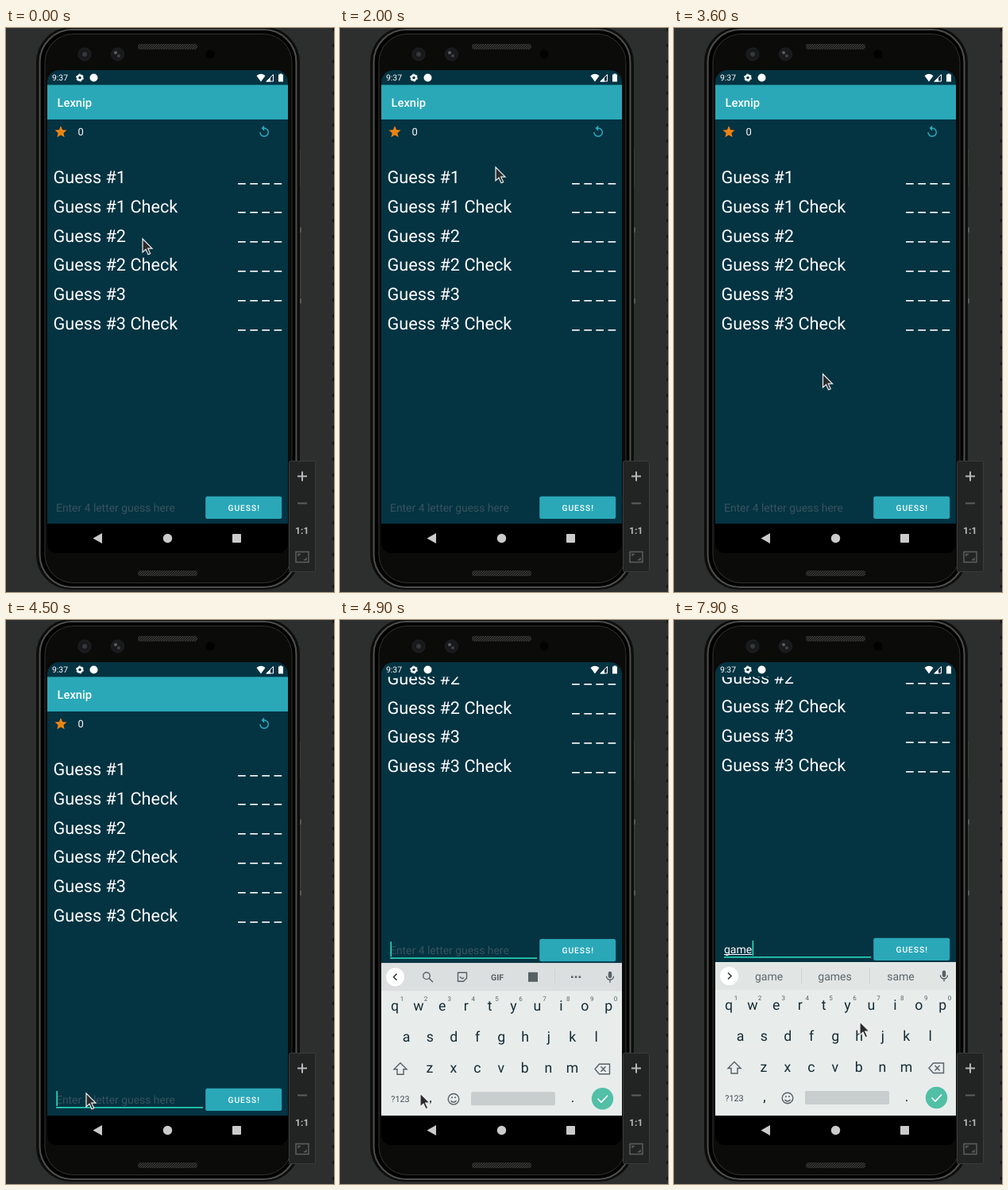
Recreate the animation shown at these times as an HTML page. Size 413 by 709 pixels, loop 8 s.

```html
<!DOCTYPE html>
<html lang="en">
<head>
<meta charset="utf-8">
<title>Word game on a phone</title>
<style>
  html, body { margin: 0; width: 100%; height: 100%; overflow: hidden; background: #2d2f2f; }
  svg { display: block; width: 413px; height: 709px; font-family: Roboto, sans-serif; text-rendering: geometricPrecision; }
  .mid { text-anchor: middle; }
  .line { fill: none; stroke: #566166; stroke-width: 1.4; }
</style>
</head>
<body>
<svg viewBox="0 0 413 709">
  <defs>
    <clipPath id="below"><rect x="52" y="71.500" width="303" height="551.500"/></clipPath>
    <pattern id="mesh" width="3" height="3" patternUnits="userSpaceOnUse">
      <rect width="3" height="3" fill="#1a1a19"/><path d="M0 3L3 0" stroke="#444"/>
    </pattern>
  </defs>

  <!-- phone -->
  <rect width="413" height="709" fill="#2d2f2f"/>
  <path d="M412 0v709" stroke="#151616" stroke-width="2" stroke-dasharray="4 16"/>
  <path d="M370 153v45M370.500 250v97" stroke="#3a3b3b" stroke-width="2.500"/>
  <path d="M371 251v6M371 340v6" stroke="#626363" stroke-width="1.500"/>
  <rect x="38" y="-1" width="332" height="707" rx="44" fill="#0d0d0c"/>
  <rect x="42.500" y="2" width="323" height="701" rx="41" fill="none" stroke="#4e4f4d" stroke-width="2"/>
  <rect x="46" y="5" width="316" height="695" rx="38" fill="#0b0b0a" stroke="#010101" stroke-width="4"/>
  <rect x="49" y="7.500" width="311" height="690" rx="36" fill="none" stroke="#30312f"/>
  <rect x="166" y="20" width="75" height="7" rx="3" fill="url(#mesh)"/>
  <rect x="166" y="682" width="75" height="7" rx="3" fill="url(#mesh)"/>
  <g fill="#18191b" stroke="#222326">
    <circle cx="99" cy="33" r="8"/><circle cx="140.500" cy="33" r="8"/>
  </g>
  <circle cx="99" cy="33" r="3" fill="#35383c"/>
  <circle cx="138" cy="31" r="2" fill="#5a5d60"/><circle cx="142" cy="35" r="2" fill="#3f4245"/>
  <circle cx="257" cy="33" r="5.500" fill="#020202"/>

  <!-- app -->
  <path d="M52 623V68a15 15 0 0 1 15-15H340a15 15 0 0 1 15 15V623z" fill="#043342"/>
  <g clip-path="url(#below)">
    <g id="content">
      <rect x="52" y="71" width="303" height="44" fill="#2aa8b8"/>
      <text x="64.500" y="99" font-size="14.750" font-weight="500" fill="#fff">Lexnip</text>
      <path transform="translate(60 121.500) scale(.75)" fill="#ee8312"
        d="M12 17.270L18.180 21l-1.640-7.030L22 9.240l-7.190-.61L12 2 9.190 8.630 2 9.240l5.460 4.730L5.820 21z"/>
      <text x="90.500" y="134.500" font-size="12.900" fill="#fff">0</text>
      <path transform="translate(316.300 121.500) scale(.737)" fill="#2aa8b8"
        d="M12 5V1L7 6l5 5V7c3.310 0 6 2.690 6 6s-2.690 6-6 6-6-2.690-6-6H4c0 4.420 3.580 8 8 8s8-3.580 8-8-3.580-8-8-8z"/>
      <g id="rows" font-size="21.700" fill="#fff"></g>
      <text id="hint" x="63" y="607.500" font-size="13.900" fill="#39535e">Enter 4 letter guess here</text>
      <text id="typed" x="63" y="607.500" font-size="14" fill="#fff"></text>
      <rect id="composing" x="63" y="609" height="1" fill="#fff"/>
      <rect id="focusLine" x="63" y="612" width="185" height="1.700" fill="#28d0b4"/>
      <rect id="caret" y="592" width="1.700" height="19" fill="#28d0b4"/>
      <rect x="251.200" y="588.700" width="96" height="28.300" rx="2.500" fill="#2aa8b8"/>
      <text class="mid" x="299.700" y="607" font-size="10.300" font-weight="500" letter-spacing=".95" fill="#fff">GUESS!</text>
    </g>
    <g id="keyboard">
      <rect x="52" y="430" width="303" height="193" fill="#e8edec"/>
      <rect id="strip" x="52" y="430" width="303" height="35"/>
      <circle cx="69.500" cy="447.500" r="11.500" fill="#fff"/>
      <path id="chevron" fill="none" stroke="#2b3438" stroke-width="1.500"/>
      <g id="tools">
        <g class="line">
          <circle cx="109" cy="446" r="4.300"/><path d="M112 449l5 5"/>
          <path d="M148.500 442h11v7l-4 4h-7zM151 447q3 4 5 1"/>
          <path d="M270.500 438v19" stroke="#cdd2d2" stroke-width="1"/>
        </g>
        <text class="mid" x="198" y="451.300" font-size="10.500" font-weight="700" fill="#566166">GIF</text>
        <rect x="237" y="441.500" width="12" height="12" fill="#566166"/>
        <path d="M291 447.500h2.500m2.300 0h2.500m2.300 0h2.500" stroke="#566166" stroke-width="2.500"/>
      </g>
      <g id="words" class="mid" font-size="14" fill="#5c666a">
        <path d="M160.500 438v19M246.500 438v19" stroke="#cdd2d2"/>
        <text x="119.500" y="453"/><text x="202.500" y="453"/><text x="285.500" y="453"/>
      </g>
      <rect x="337.800" y="440.500" width="4.400" height="8.500" rx="2.200" fill="#566166"/>
      <path class="line" d="M335.500 446.500a4.500 4.500 0 0 0 9 0M340 451v3.500"/>
      <g id="keys" class="mid" font-size="17.700" fill="#142b34"></g>
      <g class="line">
        <path d="M76 555.500l8 8h-4v6.500h-8v-6.500h-4z"/>
        <path d="M326.500 557h13v12.500h-13l-5.500-6.250zM328.500 560l6 6.500m0-6.500l-6 6.500"/>
        <circle cx="143" cy="601" r="6.800"/><path d="M139.500 603q3.500 4 7 0M140 599h2m2 0h2"/>
      </g>
      <text class="mid" x="76" y="605" font-size="10.800" fill="#3d4a50">?123</text>
      <rect x="165" y="592" width="106" height="17" rx="2" fill="#c8cdcd"/>
      <circle cx="330.500" cy="600.500" r="13.700" fill="#52bfa7"/>
      <path d="M324.500 600.500l4.500 4.500 8-8.500" fill="none" stroke="#fff" stroke-width="1.600"/>
    </g>
  </g>

  <!-- status and navigation bars -->
  <text x="58" y="66.300" font-size="10.400" fill="#fff">9:37</text>
  <circle cx="93" cy="62.500" r="3" fill="none" stroke="#fff" stroke-width="2.400"/>
  <circle cx="93" cy="62.500" r="4.500" fill="none" stroke="#fff" stroke-dasharray="2.400 2.312"/>
  <circle cx="110.500" cy="62.500" r="5" fill="#fff"/>
  <path d="M315.500 60q5.500-4.500 11 0l-5.500 7.500zM343 58.500h1.500v-1h3v1h1.500v9h-6z" fill="#fff"/>
  <path d="M336.500 58.500v8.500h-8.500z" fill="none" stroke="#fff"/>
  <path d="M333 62v5.500h-6z" fill="#fff"/>
  <path d="M52 623H355V648a12 12 0 0 1-12 12H64a12 12 0 0 1-12-12z" fill="#000"/>
  <path d="M109.500 641.500l11.500-6.500v13z" fill="#cbcbcb"/>
  <circle cx="203.500" cy="641.500" r="5.700" fill="#cbcbcb"/>
  <rect x="285" y="636" width="11" height="11" rx="1" fill="#cbcbcb"/>

  <!-- emulator panel -->
  <rect x="356.500" y="544.500" width="33" height="139" rx="2" fill="#222323" stroke="#3b3c3c"/>
  <path d="M367 563.500h12m-6-6v12" stroke="#b5b7b8" stroke-width="2"/>
  <path d="M367 597.500h12" stroke="#5c5e5f" stroke-width="2"/>
  <text class="mid" x="372.700" y="635.500" font-size="12" font-weight="700" fill="#b5b7b8">1:1</text>
  <path d="M365 658.500h16v13h-16zM368 664v-2.500h3M378 666v2.500h-3" fill="none" stroke="#5c5e5f" stroke-width="1.500"/>

  <path id="pointer" d="M0 0V17l4-3.700 3 6.500 2.700-1.200-3-6.400H12z" fill="#292b2d" stroke="#eee" stroke-width="1.200"/>
</svg>
<script>
const LOOP = 8000, STEP = 100, PAN = 189;
const $ = id => document.getElementById(id);
const show = (id, on) => $(id).setAttribute('visibility', on ? 'visible' : 'hidden');
const moveTo = (id, x, y) => $(id).setAttribute('transform', `translate(${x} ${y})`);

function addText(parent, text, x, y, attrs = {}) {
  const el = document.createElementNS('http://www.w3.org/2000/svg', 'text');
  el.textContent = text;
  for (const [k, v] of Object.entries({ x, y, ...attrs })) el.setAttribute(k, v);
  $(parent).append(el);
}

for (let i = 0; i < 6; i++) {
  const y = 195 + i * 36.8;
  addText('rows', `Guess #${(i >> 1) + 1}${i % 2 ? ' Check' : ''}`, 59.5, y);
  addText('rows', '_ _ _ _', 347.3, y - 0.5, { 'text-anchor': 'end' });
}

[['qwertyuiop', 69, 490], ['asdfghjkl', 83.5, 529], ['zxcvbnm', 113, 568]].forEach(([row, x, y]) =>
  [...row].forEach((key, i) => addText('keys', key, x + i * 29.9, y)));
[...'1234567890'].forEach((n, i) =>
  addText('keys', n, 78 + i * 29.9, 478, { 'font-size': 8, fill: '#566166' }));
addText('keys', ',', 114, 605);
addText('keys', '.', 293, 605);

// pointer path: time, x, y
const path = [
  [0, 172, 265], [200, 190, 276], [600, 190, 276], [800, 176, 247], [1000, 132, 184],
  [1200, 99, 152], [1400, 88, 144], [1500, 89, 145], [1700, 105, 163], [1900, 160, 179],
  [2100, 232, 171], [2400, 302, 153], [2700, 321, 153], [2800, 345, 155], [2900, 342, 154],
  [3000, 342, 154], [3200, 322, 190], [3500, 225, 370], [3700, 150, 500], [3900, 118, 569],
  [4300, 101, 595], [7600, 101, 595], [7700, 118, 582], [7800, 185, 535], [7900, 234, 505], [LOOP, 234, 505]
];

function pointerAt(t) {
  const i = path.findIndex(p => p[0] > t);
  const [t0, x0, y0] = path[i - 1], [t1, x1, y1] = path[i];
  const k = (t - t0) / (t1 - t0);
  return [x0 + (x1 - x0) * k, y0 + (y1 - y0) * k];
}

const suggestions = [
  ['g', 'go', 'get'], ['ga', 'game', 'gave'], ['gam', 'game', 'games'], ['game', 'games', 'same']
];

function draw(t) {
  const focused = t >= 4500;
  const open = t < 4800 ? 0 : t < 5000 ? 1 - Math.exp((4730 - t) / 34) : 1;
  const length = Math.max(0, Math.min(4, (t - 6400) / 100));

  moveTo('pointer', ...pointerAt(t));
  moveTo('content', 0, -PAN * open);
  moveTo('keyboard', 0, 193 * (1 - open));
  show('keyboard', open);
  $('strip').setAttribute('fill', open < 1 ? '#dcdfdf' : '#e1e6e5');

  $('typed').textContent = 'game'.slice(0, length);
  const width = length ? $('typed').getComputedTextLength() : 0;
  $('composing').setAttribute('width', width);
  $('caret').setAttribute('x', 63.3 + width);
  show('hint', !length);
  show('focusLine', focused);
  const blinkOff = (t >= 5000 && t < 5500) || (t >= 6100 && t < 6500) || (t >= 7300 && t < 7800);
  show('caret', focused && !blinkOff);

  show('tools', open && !length);
  show('words', length);
  $('chevron').setAttribute('d', length ? 'M68 443.500l4 4-4 4' : 'M71.500 443.500l-4 4 4 4');
  if (length) document.querySelectorAll('#words text').forEach((el, i) => {
    el.textContent = suggestions[length - 1][i];
  });
}

function tick(now) {
  draw(Math.floor(now % LOOP / STEP) * STEP);
  requestAnimationFrame(tick);
}
requestAnimationFrame(tick);
</script>
</body>
</html>
```
